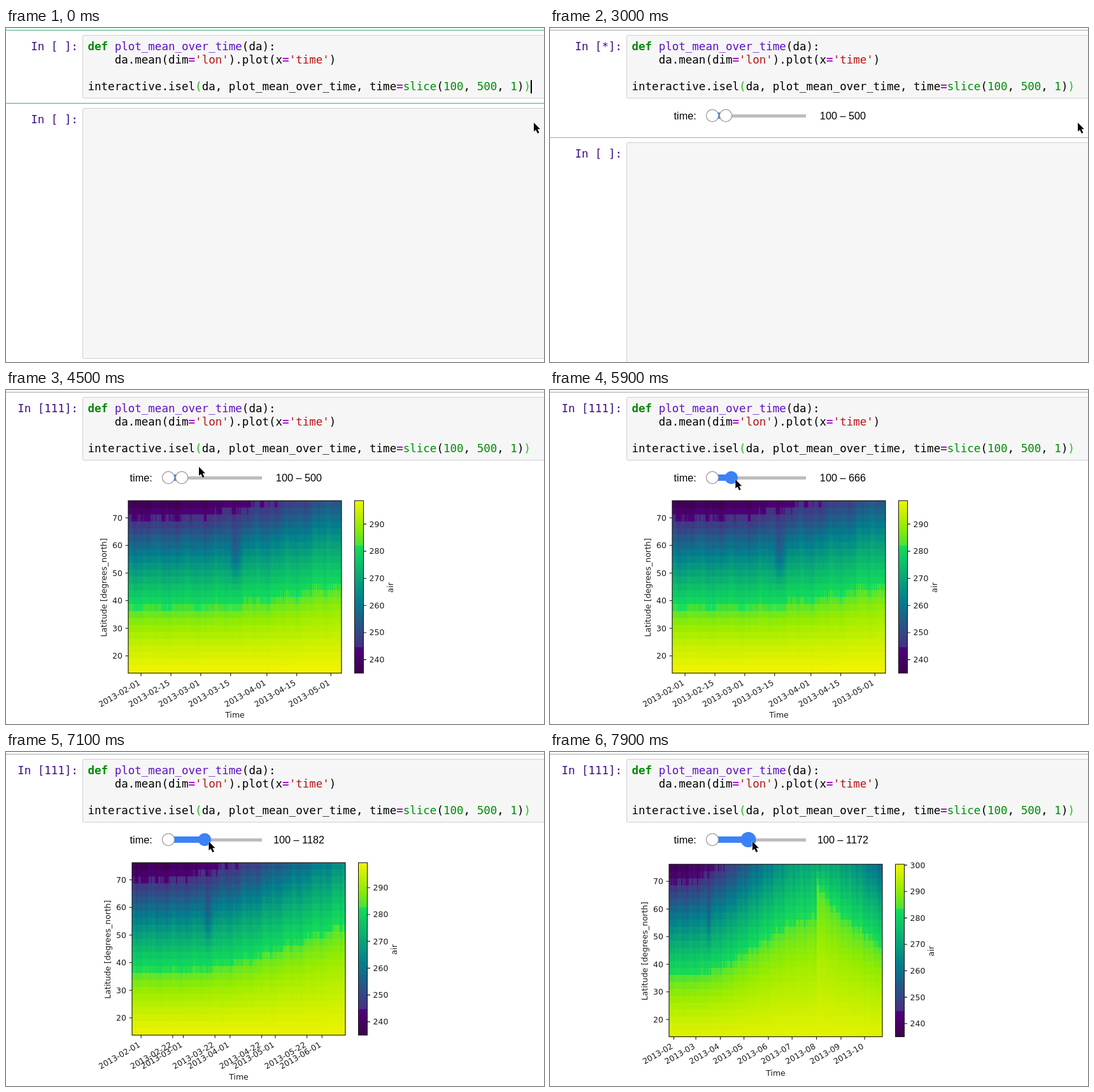
These frames come from a looping animation (845 by 526 pixels, 8 s). An HTML page with a canvas:

```html
<!DOCTYPE html>
<html lang="en">
<head>
<meta charset="utf-8">
<title>Interactive slice slider</title>
<style>
html, body { margin: 0; width: 845px; height: 526px; overflow: hidden; background: #fff; }
canvas { position: absolute; width: 335px; height: 272px; image-rendering: pixelated; }
svg { position: absolute; left: 0; top: 0; }
text { white-space: pre; }
.code { font: 17.5px "DejaVu Sans Mono", monospace; fill: #000; }
.kw { font-weight: bold; fill: #008a00; }
.def { fill: #5c10c8; }
.op { font-weight: bold; fill: #a81cd0; }
.str { fill: #b81414; }
.num { fill: #008e08; }
.br { fill: #14c414; }
.prompt { fill: #3c0c8c; text-anchor: end; }
.cell { fill: #f6f6f6; stroke: #cfcfcf; }
.ui { font: 16.25px "Liberation Sans", Arial, sans-serif; }
.plot text { font: 12.5px "DejaVu Sans", sans-serif; fill: #1c1c1c; }
.plot path, .frame { fill: none; stroke: #111; stroke-width: 1.1; }
.handle { stroke-width: 1.2; }
.mid { text-anchor: middle; }
.end { text-anchor: end; }
</style>
</head>
<body>
<svg id="stage" width="845" height="526" viewBox="0 0 845 526">
  <defs>
    <linearGradient id="ramp" x1="0" y1="1" x2="0" y2="0"></linearGradient>
    <path id="beamShape" d="M833 149.5h2.2l.8 .8l.8-.8h2.2M836 150v15M833 165.5h2.2l.8-.8l.8 .8h2.2"/>
  </defs>
  <rect id="topLine" y="2.9" width="845" height="1.1"/>
  <rect class="cell" x="120.5" y="11.5" width="740" height="99" rx="2"/>
  <g class="code">
    <text class="prompt" id="prompt" x="113" y="35"></text>
    <text x="128.5" y="35"><tspan class="kw">def</tspan> <tspan class="def">plot_mean_over_time</tspan>(da):</text>
    <text x="128.5" y="56">    da.mean(dim<tspan class="op">=</tspan><tspan class="str">'lon'</tspan>).plot(x<tspan class="op">=</tspan><tspan class="str">'time'</tspan>)</text>
    <text x="128.5" y="98">interactive.isel<tspan class="br">(</tspan>da, plot_mean_over_time, time<tspan class="op">=</tspan><tspan class="num">slice</tspan>(<tspan class="num">100</tspan>, <tspan class="num">500</tspan>, <tspan class="num">1</tspan>)<tspan class="br">)</tspan></text>
  </g>
  <rect id="caret" x="824" y="82" width="2" height="21"/>
  <g id="next">
    <rect id="bottomLine" y="118" width="845" height="1.1"/>
    <rect class="cell" x="120.5" y="126.5" width="740" height="394" rx="2"/>
    <text class="code prompt" x="113" y="150">In [ ]:</text>
  </g>
  <g id="slider" class="ui">
    <text x="194.5" y="144">time:</text>
    <rect x="246" y="136" width="156" height="5" fill="#bdbdbd"/>
    <rect id="range" x="255" y="133" height="10" fill="#3b82f6"/>
    <circle class="handle" cx="255" cy="138" r="9.6" fill="#fff" stroke="#9a9a9a"/>
    <circle class="handle" id="handle" cy="138"/>
    <text class="mid" id="value" x="460" y="144"></text>
  </g>
  <g id="plots"></g>
  <path id="arrow" d="M0 0V14L3.2 11.2L5.8 17L8.4 15.8L5.8 10.2H10Z" stroke="#fff" paint-order="stroke"/>
  <g id="beam" fill="none">
    <use href="#beamShape" stroke="#fff" stroke-width="3"/>
    <use href="#beamShape" stroke="#222" stroke-width="1.2"/>
  </g>
</svg>
<script>
const $ = id => document.getElementById(id);
const show = (el, on) => { el.style.display = on ? '' : 'none'; };
const mix = (a, b, k) => a + (b - a) * k;
const clamp = x => Math.min(1, Math.max(0, x));
const bump = (x, mid, width) => Math.exp(-(((x - mid) / width) ** 2));
const rand = n => { const v = Math.sin(n * 12.9898) * 43758.5453; return v - Math.floor(v); };

const COLD = 235, FIRST_DAY = 25, ROWS = 25, W = 335, H = 272;
const STOPS = [
  [0, '#3e004c'], [.15, '#50007d'], [.15, '#4a2e82'], [.42, '#027e8d'],
  [.74, '#12de58'], [.74, '#48e23a'], [.85, '#96ec00'], [1, '#f2f300']
];
$('ramp').innerHTML = STOPS.map(([u, c]) => `<stop offset="${u}" stop-color="${c}"/>`).join('');

function makeCanvas(width, height) {
  const c = document.createElement('canvas');
  c.width = width;
  c.height = height;
  return [c, c.getContext('2d')];
}

function readRamp() {
  const [, pen] = makeCanvas(256, 1);
  const g = pen.createLinearGradient(0, 0, 256, 0);
  STOPS.forEach(([u, c]) => g.addColorStop(u, c));
  pen.fillStyle = g;
  pen.fillRect(0, 0, 256, 1);
  return pen.getImageData(0, 0, 256, 1).data;
}
const RAMP = readRamp();

// A seasonal front at 283 K moves north in summer; air cools above it and warms below it.
function temperature(day, lat) {
  const season = .5 - .5 * Math.cos((day - 32) / 365 * 2 * Math.PI);
  const weather = Math.sin(day * .93 + lat * .06) + Math.sin(day * .41 + 1 - lat * .04)
    + .7 * Math.sin(day * 1.9 + 2);
  const grain = rand(day * 4) - .5;
  const heatwave = day > 212 ? 14 * Math.exp((212 - day) / 18) : 0;
  const front = 36 + 21 * season ** 1.4 + heatwave + (weather * .7 + grain) * (.4 + season);
  if (lat < front) return 283 + 16 * ((front - lat) / (front - 14)) ** .65;
  const polar = 237 + 35 * season;
  const north = Math.min(1.1, (lat - front) / (75 - front));
  const spell = 6 * bump(day, 75, 2.6) * bump(lat, 56, 9);
  const daily = .8 * Math.sin(day * 2 * Math.PI) * bump(lat, 42, 16);
  return mix(283, polar, north ** 1.2) + north * (weather + grain * 2) + daily - spell;
}

function heatmap(x, y, steps, vmax) {
  const [raw, pen] = makeCanvas(steps, ROWS);
  const img = pen.createImageData(steps, ROWS);
  for (let r = 0; r < ROWS; r++)
    for (let s = 0; s < steps; s++) {
      const t = temperature(FIRST_DAY + s / 4, 75 - r * 2.5);
      const i = 4 * Math.round(255 * clamp((t - COLD) / (vmax - COLD)));
      img.data.set(RAMP.subarray(i, i + 4), 4 * (r * steps + s));
    }
  pen.putImageData(img, 0, 0);
  const [map, out] = makeCanvas(W, ROWS);
  out.imageSmoothingQuality = 'high';
  out.drawImage(raw, 0, 0, W, ROWS);
  map.style.left = x + 'px';
  map.style.top = y + 'px';
  document.body.insertBefore(map, $('stage'));
  return map;
}

const label = (x, y, s, cls = '', turn = 0) =>
  `<text class="${cls}" transform="translate(${x} ${y}) rotate(${turn})">${s}</text>`;

function makePlot({ x, y, steps, vmax, monthDays, chars, titleY }) {
  const bottom = y + H, bar = x + 355.5, span = steps / 4;
  let marks = '', html = '';
  for (let lat = 20; lat <= 70; lat += 10) {
    const ly = y + (76.25 - lat) / 62.5 * H;
    marks += `M${x} ${ly}h-4.5`;
    html += label(x - 9, ly + 4.5, lat, 'end');
  }
  for (let d = 0; d < span; d++) {
    const date = new Date(Date.UTC(2013, 0, 1 + FIRST_DAY + d));
    if (!monthDays.includes(date.getUTCDate())) continue;
    const dx = x + d * W / span;
    marks += `M${dx} ${bottom}v4.5`;
    html += label(dx - .5, bottom + 17.5, date.toISOString().slice(0, chars), 'end', -30);
  }
  for (let v = 240; v <= vmax; v += 10) {
    const vy = y + (vmax - v) / (vmax - COLD) * H;
    marks += `M${bar + 14} ${vy}h4.5`;
    html += label(bar + 23, vy + 4.5, v);
  }
  const box = `y="${y + .3}" height="${H - .4}"`;
  html += label(x - 34, y + 137, 'Latitude [degrees_north]', 'mid', -90)
    + label(bar + 60, y + 137, 'air', 'mid', -90)
    + label(x + W / 2, titleY, 'Time', 'mid')
    + `<path d="${marks}"/><rect class="frame" x="${x}" width="${W}" ${box}/>`
    + `<rect x="${bar}" width="14" ${box} fill="url(#ramp)" stroke="#111"/>`;
  const g = document.createElementNS('http://www.w3.org/2000/svg', 'g');
  g.setAttribute('class', 'plot');
  g.innerHTML = html;
  $('plots').append(g);
  return [g, heatmap(x, y, steps, vmax)];
}

const plots = [
  { x: 192, y: 174, steps: 400, vmax: 298.7, monthDays: [1, 15], chars: 10, titleY: 516 },
  { x: 198, y: 174, steps: 566, vmax: 299.4, monthDays: [1, 22], chars: 10, titleY: 516 },
  { x: 187, y: 176.5, steps: 1082, vmax: 300.4, monthDays: [1], chars: 7, titleY: 510 }
].map(makePlot);

// time, x, y on the way to the slider
const PATH = [[4000, 829, 149], [4200, 470, 65], [4300, 343, 98], [4500, 303, 121], [4900, 282.5, 141]];

function pointer(t, knobX) {
  if (t <= PATH[0][0]) return PATH[0].slice(1);
  const i = PATH.findIndex(p => p[0] > t);
  if (i < 0) return [knobX + 6.5, 141];
  const a = PATH[i - 1], b = PATH[i], k = (t - a[0]) / (b[0] - a[0]);
  return [mix(a[1], b[1], k), mix(a[2], b[2], k)];
}

const drag = (t, from, to) => 1 - (1 - clamp((t - from) / (to - from))) ** 1.5;
const sliderValue = t => Math.round(500 + 166 * drag(t, 5200, 5900) + 516 * drag(t, 6400, 7000))
  - (t >= 7900 ? 10 : 0);
const within = (t, from, to) => t >= from && t < to;

// The caret blinks each half second and restarts on a key press.
const caretOn = t => t < 500 || (t - (t < 2100 ? 500 : 2100)) % 1000 < 500;

function draw(time) {
  const t = Math.floor(time / 100) * 100;
  const run = t >= 2900, widget = t >= 3000, done = t >= 3200;
  const line = run ? '#ababab' : '#48b47c';
  $('topLine').setAttribute('fill', line);
  $('bottomLine').setAttribute('fill', line);
  $('prompt').textContent = done ? 'In [111]:' : run ? 'In [*]:' : 'In [ ]:';
  show($('caret'), !run && caretOn(t));
  show($('next'), !done);
  $('next').setAttribute('transform', `translate(0 ${widget ? 54 : 0})`);

  const v = sliderValue(t), knobX = 249.7 + v * .0527, knob = $('handle');
  const hot = t >= 4800;
  const held = within(t, 4800, 5900) || within(t, 6500, 7100) || t >= 7900;
  show($('slider'), widget);
  $('range').setAttribute('width', knobX - 255);
  $('value').textContent = `100 – ${v}`;
  knob.setAttribute('cx', knobX);
  knob.setAttribute('r', held ? 11.5 : 9.6);
  knob.setAttribute('fill', hot ? '#3b82f6' : '#fff');
  knob.setAttribute('stroke', hot ? '#3b82f6' : '#9a9a9a');

  const current = done + (t >= 6200) + (t >= 7400) - 1;
  plots.forEach((parts, i) => parts.forEach(el => show(el, i === current)));

  const [px, py] = pointer(t, knobX), beam = t >= 500 && !run;
  show($('beam'), beam);
  show($('arrow'), !beam);
  $('arrow').setAttribute('transform', `translate(${px} ${py})`);
}

const start = performance.now();
function tick() {
  draw((performance.now() - start) % 8000);
  requestAnimationFrame(tick);
}
tick();
</script>
</body>
</html>
```
